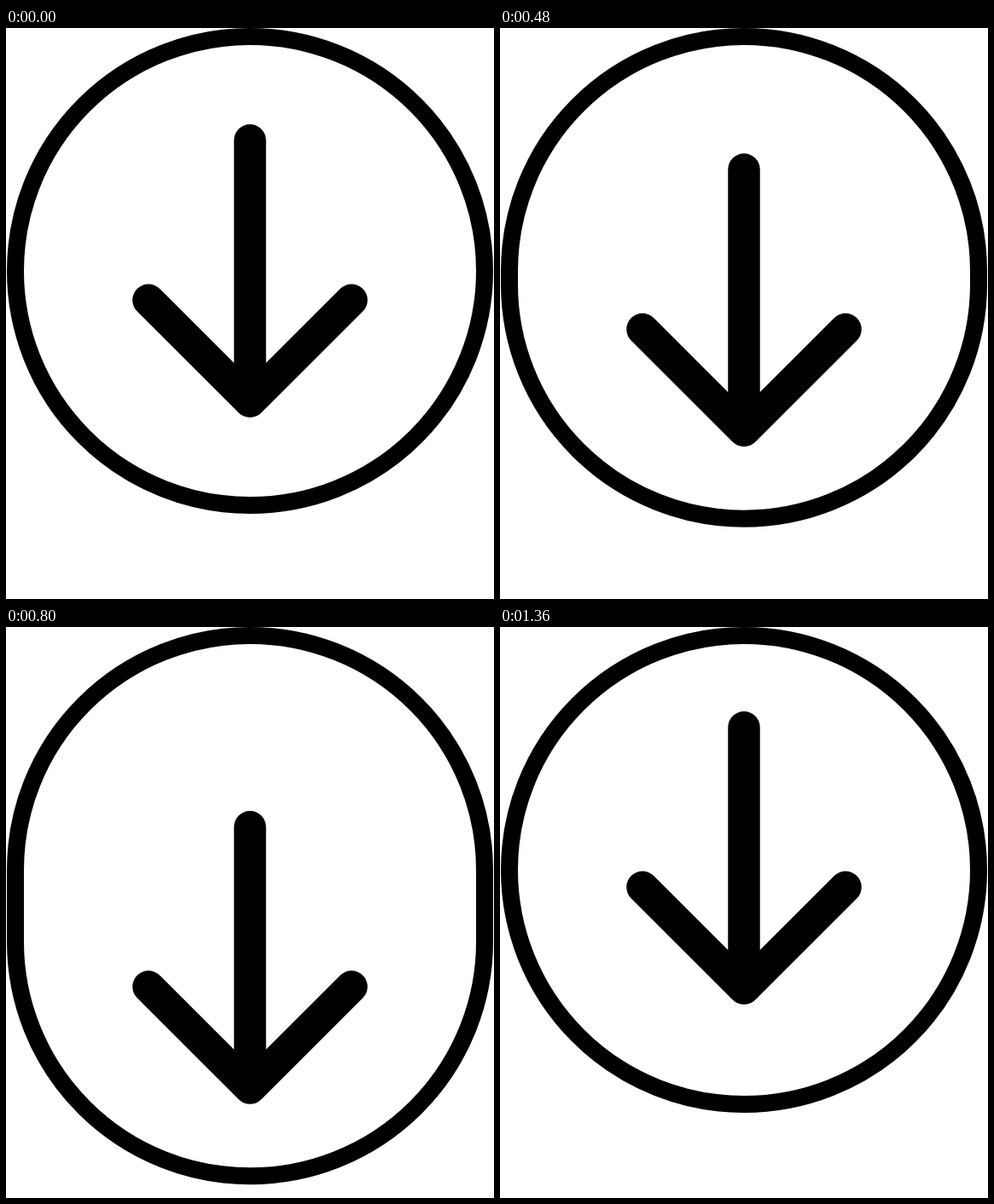
Write an HTML page that moves like this. It is 572 px wide and 670 px high and loops after 1440 ms.

```html
<!DOCTYPE html>
<html lang="en">
<head>
<meta charset="utf-8">
<title>Download arrow</title>
<style>
  html, body { margin: 0; height: 100%; overflow: hidden; background: #fff; }
  svg { display: block; }
</style>
</head>
<body>
<svg width="572" height="670" fill="none" stroke="#000">
  <rect id="ring" x="11" y="10" width="550" height="550" rx="275" stroke-width="20"/>
  <path id="arrow" d="M286 131.7V438.2M167 319.2L286 438.2L405 319.2"
        stroke-width="37.5" stroke-linecap="round" stroke-linejoin="round"/>
</svg>
<script>
  const PERIOD = 1440, STEP = 80;
  const SPEED = 3 / 7;       // downward speed, px per ms
  const GAP = 18.6;          // arrow travel before the ring starts to stretch
  const MAX_STRETCH = 100;
  const ring = document.getElementById('ring');
  const arrow = document.getElementById('arrow');

  // Wind up slowly, plunge, then play the same path backwards.
  function arrowOffset(time) {
    const t = PERIOD / 2 - Math.abs(PERIOD / 2 - time);
    const windUp = Math.min(0, (9 - t) * 0.197);
    const plunge = (t - 400) * SPEED;
    return Math.min(GAP + MAX_STRETCH, Math.max(windUp, plunge));
  }

  function draw(now) {
    const time = Math.floor((now % PERIOD) / STEP) * STEP;
    const y = arrowOffset(time);
    arrow.setAttribute('transform', `translate(0 ${y})`);
    ring.setAttribute('height', 550 + Math.max(0, y - GAP));
  }

  const start = performance.now();
  function tick() {
    draw(performance.now() - start);
    requestAnimationFrame(tick);
  }
  tick();
</script>
</body>
</html>
```
